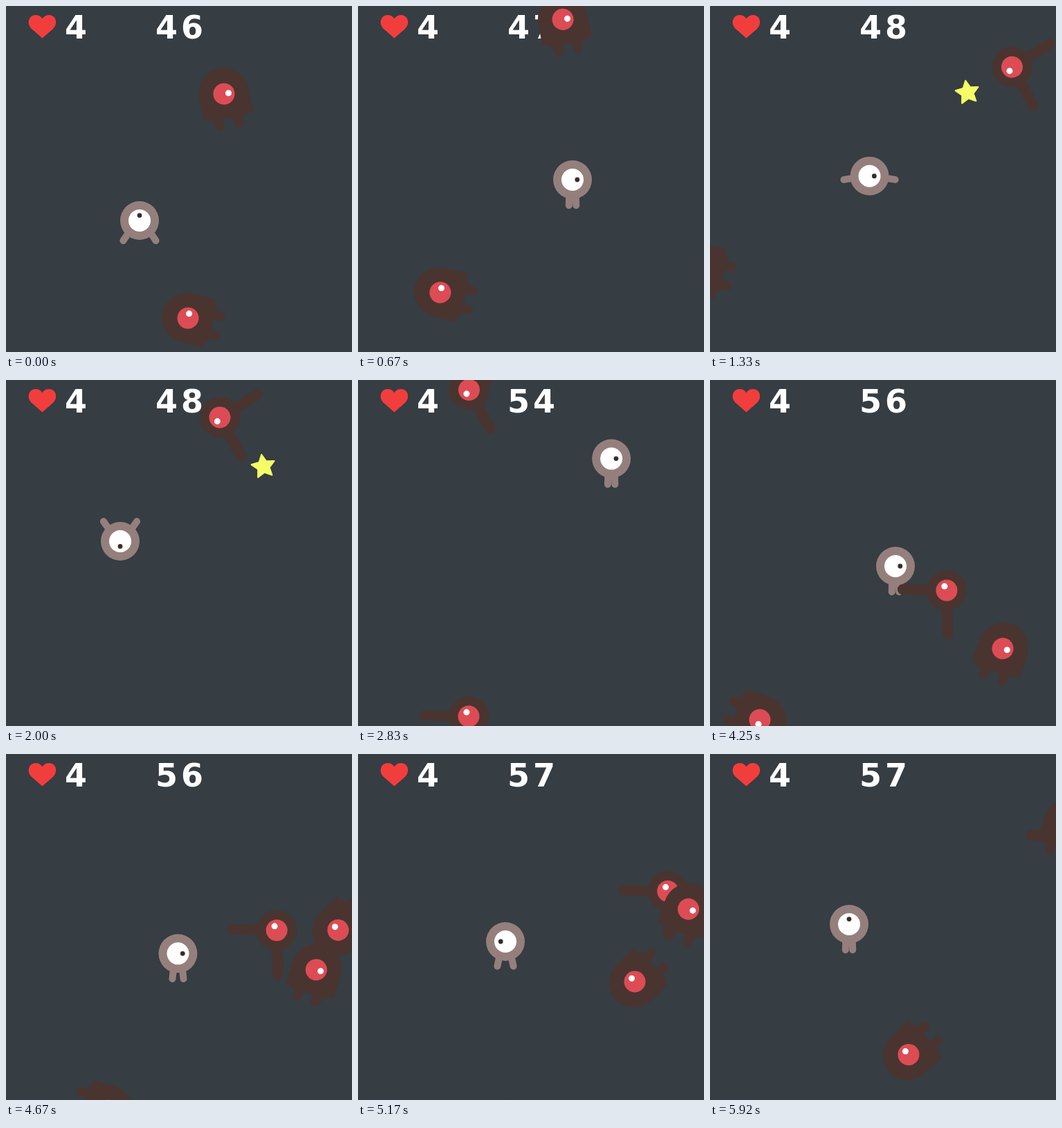
Write an HTML page that moves like this. It is 500x500 px and loops after 6010 ms.

```html
<!DOCTYPE html>
<html lang="en">
<head>
<meta charset="utf-8">
<title>One-eyed dodger</title>
<style>
  html, body { margin: 0; width: 100%; height: 100%; overflow: hidden; background: #363d43; }
  svg { display: block; width: 100vw; height: 100vh; }
  text { font: bold 46px "DejaVu Sans", sans-serif; fill: #fff; letter-spacing: 5px; }
</style>
</head>
<body>
<svg viewBox="0 0 500 500">
  <defs>
    <g id="ghost">
      <path fill="#4a342f" d="M-36 0A36 38 0 0 1 36 0L37 33L29 31L27 36L-27 36L-29 31L-36 33Z"/>
      <path stroke="#4a342f" stroke-width="13" stroke-linecap="round" d="M-14 30V45M14 30V45"/>
      <circle r="15.5" fill="#dc4c55"/>
      <circle cx="6.6" r="4.5" fill="#fff"/>
    </g>
    <g id="walker">
      <path stroke="#4a342f" stroke-width="15" stroke-linecap="round" d="M-46 44L0 0L46 44" fill="none"/>
      <circle r="29" fill="#4a342f"/>
      <circle r="15.5" fill="#dc4c55"/>
      <circle cx="-6.4" cy="-2" r="4.5" fill="#fff"/>
    </g>
  </defs>
  <rect width="500" height="500" fill="#363d43"/>
  <path fill="#f23d3d" d="M52.5 46.5L37 33C29 25 33 13 43 13C48 13 51 16 52.5 18.5C54 16 57 13 62 13C72 13 76 25 68 33Z"/>
  <text x="85" y="47">4</text>
  <text id="score" x="253" y="47" text-anchor="middle"></text>
  <path id="star" fill="#f6fc66" stroke="#f6fc66" stroke-width="2" stroke-linejoin="round"/>
  <g id="hero">
    <path id="legs" stroke="#957f7c" stroke-width="10" stroke-linecap="round" fill="none"/>
    <circle r="28" fill="#957f7c"/>
    <circle r="16" fill="#fff"/>
    <circle id="pupil" r="3.4" fill="#3c2b2a"/>
  </g>
  <g id="foes"></g>
</svg>
<script>
const LOOP = 6010, STEP = 250 / 3, LAST = 71, RAD = Math.PI / 180;
const STAR_ON = 16, STAR_OFF = 33, DRAG = 0.0039;
const UP = -90, RIGHT = 0, DOWN = 90, LEFT = 180;
const $ = id => document.getElementById(id);

const pose = (at, x, y, gaze, spread) => ({ at, x, y, gaze, spread });
const poses = [
  pose(0, 193, 310, UP, 39),
  pose(8, 310, 251, RIGHT, 8),
  pose(24, 165, 233, DOWN, 140),
  pose(33, 368, 124, RIGHT, 12),
  pose(43, 212, 53, LEFT, 17),
  pose(51, 268, 269, RIGHT, 8),
  pose(62, 213, 271, LEFT, 18),
  pose(71, 201, 246, UP, 8)
];

// a foe flies head first along its heading, slowing a little
function foe(kind, at, x, y, heading, speed) {
  const el = document.createElementNS("http://www.w3.org/2000/svg", "use");
  el.setAttribute("href", "#" + kind);
  $("foes").append(el);
  return n => {
    const t = n - at, d = speed * t * (1 - DRAG * t), a = heading * RAD;
    el.setAttribute("transform",
      `translate(${x + d * Math.sin(a)} ${y - d * Math.cos(a)}) rotate(${heading})`);
  };
}
const foes = [
  foe("ghost", 0, 315, 127, -10, 14.1),
  foe("ghost", 0, 263, 451, -75.6, 19.2),
  foe("walker", 24, 309, 54, -75, 16),
  foe("walker", 51, 342, 304, 45, 14.2),
  foe("ghost", 51, 423, 388, 18.4, 16.4),
  foe("ghost", 51, 72, 491, 108, 16),
  foe("ghost", 62, 400, 329, -133, 17.8)
];

function starPath(cx, cy, r, tilt) {
  const pts = Array.from({ length: 10 }, (_, i) => {
    const a = tilt + i * Math.PI / 5, d = i % 2 ? r / 2 : r;
    return `${cx + d * Math.sin(a)} ${cy - d * Math.cos(a)}`;
  });
  return "M" + pts.join("L") + "Z";
}
$("star").setAttribute("d", starPath(372, 125, 17.5, -0.16));

// smooth curve through one property of the poses
function curve(key, n) {
  const end = poses.length - 1;
  const i = Math.min(end, poses.findIndex(p => p.at > n) + end + 1 - 1) % (end + 1);
  const hi = Math.max(1, poses.findIndex(p => p.at >= n)), lo = hi - 1;
  const slope = k => {
    const a = poses[Math.max(k - 1, 0)], b = poses[Math.min(k + 1, end)];
    return (b[key] - a[key]) / (b.at - a.at);
  };
  const p = poses[lo], q = poses[hi], h = q.at - p.at, u = (n - p.at) / h, v = 1 - u;
  return v * v * (1 + 2 * u) * p[key] + u * u * (3 - 2 * u) * q[key]
    + h * u * v * (v * slope(lo) - u * slope(hi));
}

function drawHero(n) {
  $("hero").setAttribute("transform", `translate(${curve("x", n)} ${curve("y", n)})`);

  const a = Math.max(8, curve("spread", n)) * RAD;
  const x = 37.5 * Math.sin(a), y = 37.5 * Math.cos(a), hip = Math.min(x, 4);
  $("legs").setAttribute("d", `M${-x} ${y}L${-hip} 0M${x} ${y}L${hip} 0`);

  const near = poses.reduce((p, q) => Math.abs(q.at - n) < Math.abs(p.at - n) ? q : p);
  $("pupil").setAttribute("cx", 6.8 * Math.cos(near.gaze * RAD));
  $("pupil").setAttribute("cy", 7.4 * Math.sin(near.gaze * RAD));
}

function draw(ms) {
  const n = Math.min(LAST, Math.floor((ms % LOOP + 6) / STEP));
  $("score").textContent = 46 + Math.floor((n + 10) / 12) + (n >= STAR_OFF ? 5 : 0);
  $("star").style.display = n >= STAR_ON && n < STAR_OFF ? "" : "none";
  drawHero(n);
  foes.forEach(move => move(n));
}

const start = performance.now();
function tick() {
  draw(performance.now() - start);
  requestAnimationFrame(tick);
}
tick();
</script>
</body>
</html>
```
